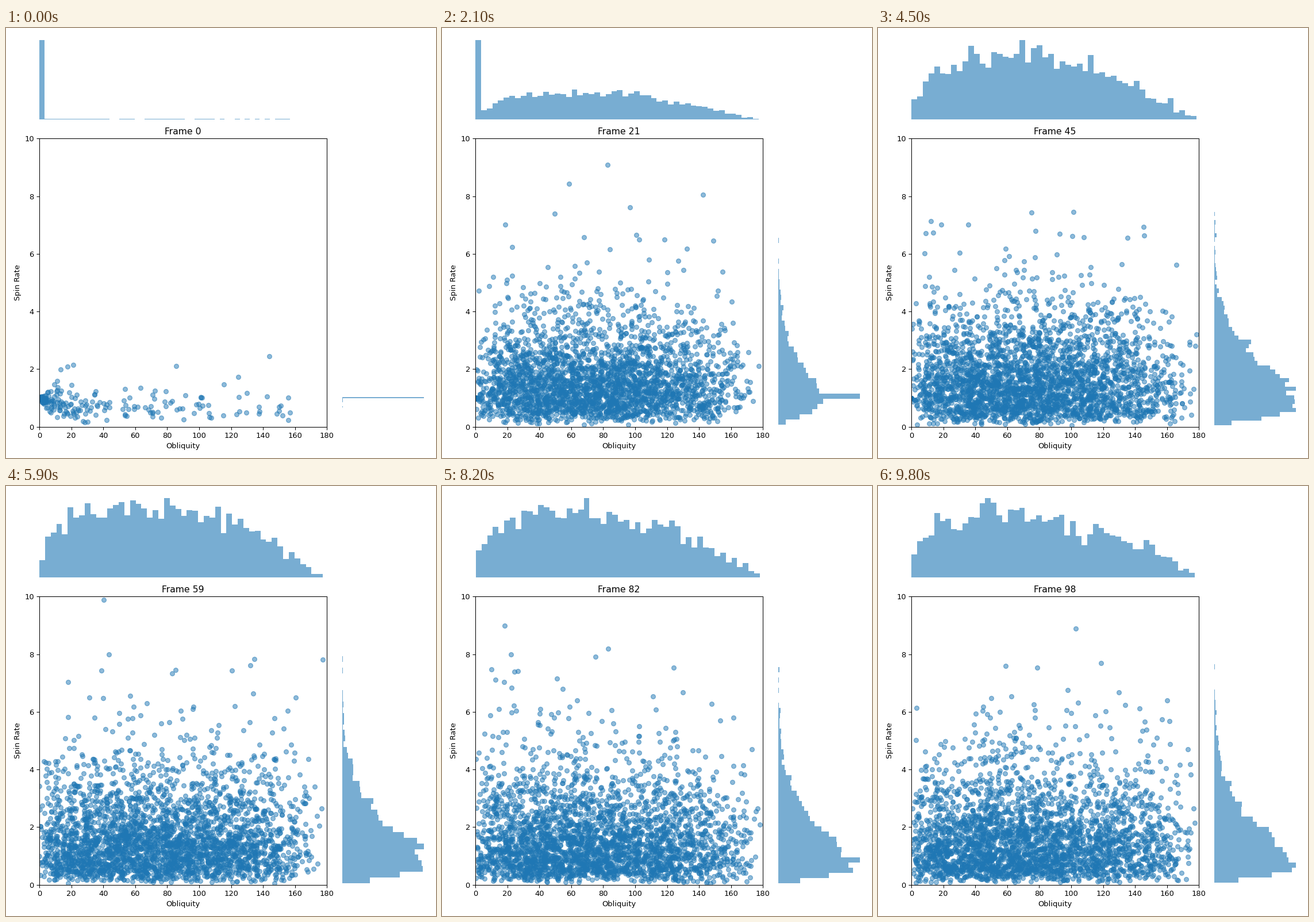
Write a matplotlib script that moves like this. It is 748 by 748 pixels and loops after 9900 ms.

```python
import numpy as np
import matplotlib.pyplot as plt
from matplotlib.animation import FuncAnimation
from matplotlib.gridspec import GridSpec

FRAMES, COUNT, BINS = 99, 3000, 50
HIT_RATE = 0.12
SETTLE = 55      # frames until the distribution stops drifting
FRESH_TIME = 2   # decay time of the share of first impacts

rng = np.random.default_rng(12)


def first_impacts(n):
    """Mostly slight tilts; the spin scatters more as the tilt grows."""
    angle = 157 * rng.random(n) ** 5.5
    spread = np.tanh(angle / 15)
    return np.column_stack([angle, np.exp(spread * rng.normal(-0.3, 0.5, n))])


def mixed_state(n, t):
    """Obliquity and spin after many impacts."""
    late = min(t / SETTLE, 1)
    angle = 179 * rng.beta(1.75 - 0.35 * late, 2.35 - 0.5 * late, n)
    spin = 0.05 + rng.gamma(2.6 - 0.7 * late, 0.62 + 0.25 * late, n)
    return np.column_stack([angle, spin])


def simulate():
    """Each step, a random share of the bodies is hit and jumps elsewhere."""
    state = np.tile([0.0, 1.0], (COUNT, 1))
    history = []
    for t in range(FRAMES):
        hit = np.flatnonzero(rng.random(COUNT) < HIT_RATE)
        n = len(hit)
        fresh = rng.random((n, 1)) < np.exp(-t / FRESH_TIME)
        state[hit] = np.where(fresh, first_impacts(n), mixed_state(n, t))
        history.append(state.copy())
    return history


def histogram(values):
    counts, edges = np.histogram(values, BINS)
    return zip(counts / counts.max(), edges, np.diff(edges))


history = simulate()

fig = plt.figure(figsize=(8, 8), dpi=93.5)
grid = GridSpec(4, 4, figure=fig)
ax = fig.add_subplot(grid[1:, :3])
ax_top = fig.add_subplot(grid[0, :3])
ax_side = fig.add_subplot(grid[1:, 3])

ax.set(xlim=(0, 180), ylim=(0, 10), xlabel="Obliquity", ylabel="Spin Rate")
title = ax.set_title("Frame 0")
dots = ax.scatter(*history[0].T, color="C0", alpha=0.5)

slots = np.arange(BINS)
top_bars = ax_top.bar(slots, slots, color="C0", alpha=0.6)
side_bars = ax_side.barh(slots, slots, color="C0", alpha=0.6)
ax_top.set(xlim=(0, 180), ylim=(0, 1.05))
ax_side.set(xlim=(0, 1.05), ylim=(0, 10))
ax_top.axis("off")
ax_side.axis("off")


def draw(t):
    points = history[t]
    dots.set_offsets(points)
    title.set_text(f"Frame {t}")
    for bar, (size, edge, width) in zip(top_bars, histogram(points[:, 0])):
        bar.set_bounds(edge, 0, width, size)
    for bar, (size, edge, width) in zip(side_bars, histogram(points[:, 1])):
        bar.set_bounds(0, edge, size, width)
    return [dots, title, *top_bars, *side_bars]


draw(0)
fig.tight_layout()

anim = FuncAnimation(fig, draw, frames=FRAMES, interval=100, repeat=True,
                     repeat_delay=0)
plt.show()
```
